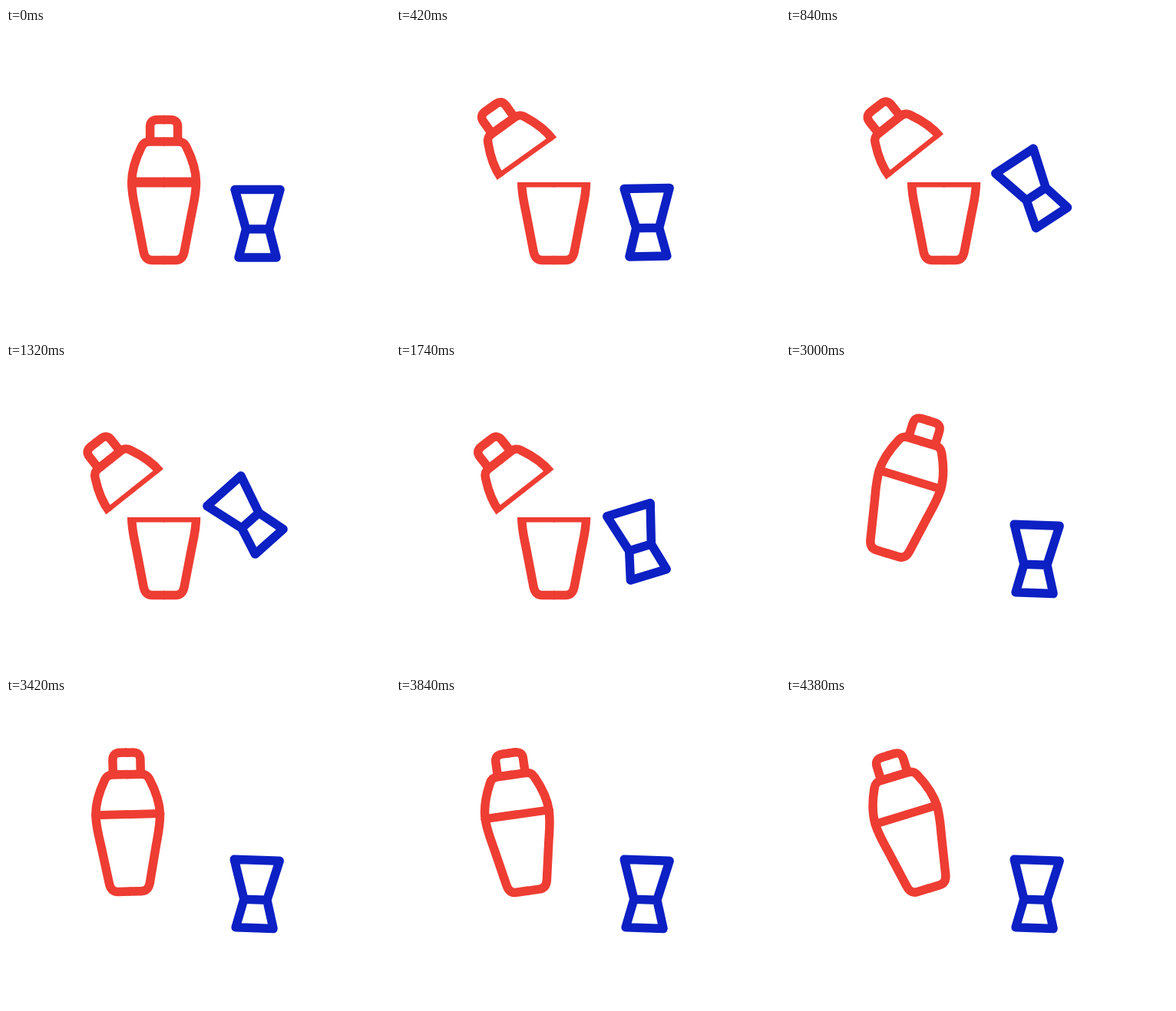
Recreate the animation shown at these times as an HTML page with a canvas. Size 500 by 400 pixels, loop 4500 ms.

```html
<!DOCTYPE html>
<html lang="en">
<head>
<meta charset="utf-8">
<title>Cocktail shaker</title>
<style>
html, body { margin: 0; width: 100%; height: 100%; overflow: hidden; background: #fff; }
canvas { display: block; }
</style>
</head>
<body>
<canvas id="stage" width="500" height="400"></canvas>
<script>
const ctx = document.getElementById('stage').getContext('2d');
const RED = '#ee3d33', BLUE = '#0c20c4';
const LOOP = 4500, AXIS = 205.6, SEAM = 201, LINE = 11.5;

// Right halves, measured from the shaker's axis
const shell = new Path2D('M-1 148H18.3C24 148 27 150 29.3 155C37.2 171 41.9 186 41.9 201' +
  'C41.9 217 38.4 230 36 242L26.5 291.5C25 299 21.3 302.5 15 302.5H-1');
const knob = new Path2D('M-1 119.5H8.4Q18 119.5 18 129V148');
const band = new Path2D('M-1 201H41.9');
const jigger = new Path2D('M298 210.5H357L342.5 262L352 299H303L312.5 262ZM312.5 262H342.5');

const clamp = x => Math.min(1, Math.max(0, x));
const ease = (n, from, to) => {
  const x = clamp((n - from) / (to - from));
  return x * x * (3 - 2 * x);
};

// Steps run in groups of five: four of 30 ms, then one of 60 ms
function stepAt(ms) {
  if (ms < 60) return -1;
  const t = ms - 60;
  return Math.min(120, 5 * Math.floor(t / 180) + Math.min(4, Math.floor(t % 180 / 30)));
}

function turn(cx, cy, dx, dy, deg) {
  ctx.translate(cx + dx, cy + dy);
  ctx.rotate(deg * Math.PI / 180);
  ctx.translate(-cx, -cy);
}

function drawPart(top, bottom) {
  ctx.save();
  ctx.beginPath();
  ctx.rect(0, top, 500, bottom - top);
  ctx.clip();
  ctx.translate(AXIS, 0);
  ctx.strokeStyle = RED;
  for (const side of [1, -1]) {
    ctx.save();
    ctx.scale(side, 1);
    ctx.lineWidth = LINE;
    ctx.stroke(shell);
    ctx.stroke(knob);
    ctx.lineWidth = 13;
    ctx.stroke(band);
    ctx.restore();
  }
  ctx.restore();
}

function shaker(n) {
  const drift = 0.985 + 0.025 * Math.sin(Math.PI * clamp(n / 60));
  const shut = ease(n, 53.3, 63.3);
  const open = ease(n, -1, 12) * (1 - shut) * drift;
  const lift = ease(n, 67, 81);
  const swing = 17 * clamp((n - 67) / 8) * Math.cos(Math.PI * (n - 82) / 3.455);
  ctx.save();
  turn(AXIS, 211, -46.7 * lift, -50.4 * lift, swing);
  drawPart(SEAM, 400);
  // The lid lands a little lower than it started
  turn(AXIS, SEAM, -37.6 * open, 2 * shut - 33 * open, -38.1 * open);
  drawPart(0, SEAM);
  ctx.restore();
}

function measure(n) {
  let dx, dy, deg;
  if (n < 29.4) {
    const p = ease(n, 8, 29.3);
    dx = -13.6 * p ** 2.69;
    dy = -61.1 * p;
    deg = -45.7 * p;
  } else {
    const p = 1 - ease(n, 29.5, 60.3), arc = p * (1 - p);
    dx = -2.4 - 11.2 * p - 19.8 * arc;
    dy = 0.7 - 61.8 * p + 11.3 * arc;
    deg = 2 - 47.7 * p;
  }
  ctx.save();
  turn(327.5, 254.8, dx, dy, deg);
  ctx.strokeStyle = BLUE;
  ctx.lineWidth = LINE;
  ctx.lineJoin = ctx.lineCap = 'round';
  ctx.stroke(jigger);
  ctx.restore();
}

const start = performance.now();
function draw() {
  const n = stepAt((performance.now() - start) % LOOP);
  ctx.fillStyle = '#fff';
  ctx.fillRect(0, 0, 500, 400);
  measure(n);
  shaker(n);
  requestAnimationFrame(draw);
}
draw();
</script>
</body>
</html>
```
